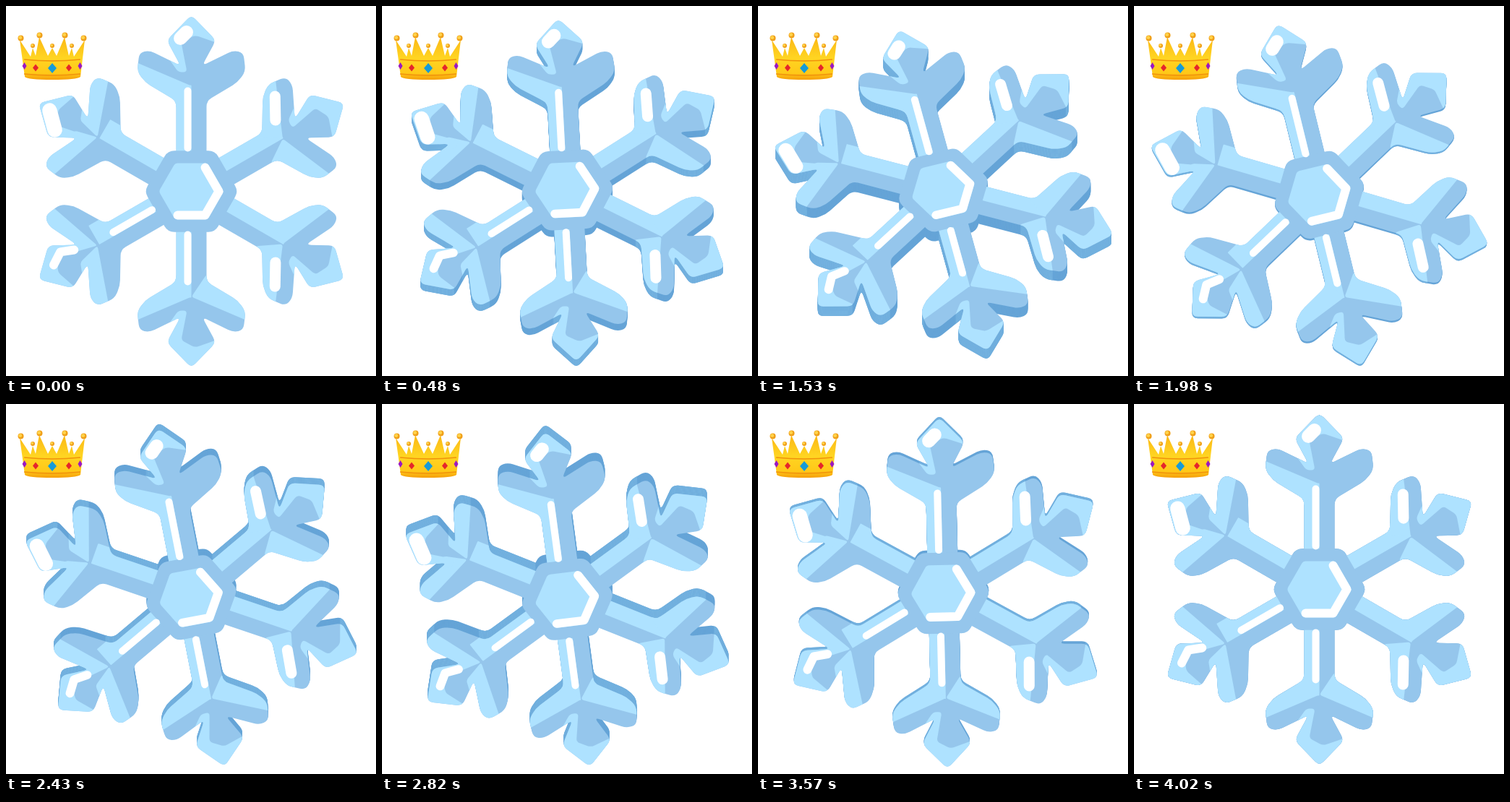
Write an HTML page with a canvas that moves like this. It is 512 px wide and 512 px high and loops after 4.05 s.

```html
<!DOCTYPE html>
<html lang="en">
<head>
<meta charset="utf-8">
<title>Snowflake</title>
<style>
html, body { margin: 0; width: 100%; height: 100%; overflow: hidden; background: #fff; }
canvas { display: block; width: 100vw; height: 100vh; }
</style>
</head>
<body>
<canvas id="stage" width="512" height="512"></canvas>
<script>
const ctx = document.getElementById('stage').getContext('2d');
const LOOP = 4050, STEP = 30, DEPTH = 39, MID = 256.5;
const FACE = { light: '#aee2ff', mid: '#95c6ec' };
const SIDE = { light: '#75b3e0', mid: '#65a4d7' };

// Closed path with rounded corners; each point is [across, outward].
function shape(points, radius) {
  const path = new Path2D(), n = points.length;
  const mix = (a, b, u) => [a[0] + (b[0] - a[0]) * u, -(a[1] + (b[1] - a[1]) * u)];
  points.forEach((p, i) => {
    const toward = q => mix(p, q, Math.min(0.5, radius / Math.hypot(q[0] - p[0], q[1] - p[1])));
    const start = toward(points[(i + n - 1) % n]);
    if (i) path.lineTo(...start); else path.moveTo(...start);
    path.quadraticCurveTo(p[0], -p[1], ...toward(points[(i + 1) % n]));
  });
  path.closePath();
  return path;
}

const flip = (points, s) => points.map(([x, r]) => [x * s, r]);

const hexagon = radius => Array.from({ length: 6 }, (_, i) =>
  [radius * Math.cos(i * Math.PI / 3), radius * Math.sin(i * Math.PI / 3)]);

// Right half of an arm: stem, branch, notch, tip.
const half = [[21, 40], [21, 125], [64, 151], [75, 166], [72, 192], [58, 195], [15, 174], [34, 209]];
const outline = shape([...half, [0, 244], ...flip(half, -1).reverse()], 8);

// Lit facets; s is the lit side looking outward, b the side of the branch.
const stemLight = s => shape(flip([[0, 30], [0, 147], [30, 147], [30, 30]], s), 1);
const branchLight = (b, s) => shape(flip(s === b ?
  [[0, 146], [80, 180], [90, 145], [21, 115]] :
  [[0, 150], [80, 178], [80, 210], [8, 182]], b), 4);
const tipLight = s => shape(flip(
  [[6, 165], [14, 206], [-5, 216], [-40, 204], [0, 260], [50, 210], [18, 165]], s), 5);

// Lit side of stem, left branch, right branch and tip, clockwise from the top arm.
const arms = ['LL-L', 'LLRL', 'LLRR', 'RLRR', 'RRLR', 'RRLL'].map(lit => {
  const [stem, left, right, tip] = [...lit].map(c => ({ L: -1, R: 1 })[c]);
  const lights = [stemLight(stem), branchLight(-1, left), tipLight(tip)];
  if (right) lights.push(branchLight(1, right));
  return lights;
});

const hub = shape(hexagon(65), 9);
const core = shape(hexagon(45), 4);

// Cosine easing through [time, value] poses.
function track(...poses) {
  return t => {
    const i = poses.findIndex(p => p[0] > t);
    const [t0, a] = poses[i - 1], [t1, b] = poses[i];
    return a + (b - a) * (1 - Math.cos(Math.PI * (t - t0) / (t1 - t0))) / 2;
  };
}

const turnAt = track([0, 0], [1600, 14.6], [LOOP, 0]);
const tiltAt = track([0, 0], [900, 24], [1200, 24.5], [2750, -17], [LOOP, 0]);
const liftAt = track([0, 0], [1050, -4.5], [2900, 14], [LOOP, 0]);
const rad = deg => deg * Math.PI / 180;

function fill(path, color) {
  ctx.fillStyle = color;
  ctx.fill(path);
}

function onArm(i, draw) {
  ctx.save();
  ctx.rotate(i * Math.PI / 3);
  draw();
  ctx.restore();
}

function drawBody(tone) {
  arms.forEach((lights, i) => onArm(i, () => {
    fill(outline, tone.mid);
    ctx.clip(outline);
    for (const l of lights) fill(l, tone.light);
  }));
  fill(hub, tone.mid);
}

function glint(width, ...points) {
  ctx.strokeStyle = '#fff';
  ctx.lineCap = ctx.lineJoin = 'round';
  ctx.lineWidth = width;
  ctx.beginPath();
  for (const [x, r] of points) ctx.lineTo(x, -r);
  ctx.stroke();
}

function drawGlints() {
  fill(core, FACE.light);
  const [right, upper, , , lowLeft, low] = hexagon(38);
  glint(12, upper, right, low, lowLeft);
  for (const [i, s, end] of [[0, -1, 139], [3, 1, 125], [4, 1, 122]])
    onArm(i, () => glint(10, [s * 5, 60], [s * 5, end]));
  for (const [i, s] of [[1, -1], [2, 1]])
    onArm(i, () => glint(15, [s * 27, 150], [s * 56, 166]));
  for (const [i, size] of [[0, 6], [5, 14]])
    onArm(i, () => glint(17 + size / 4, [-11 - size * 0.7, 216 - size * 0.7], [-11 + size * 0.7, 216 + size * 0.7]));
  onArm(4, () => glint(12, [7, 216], [18, 199], [11, 181]));
}

function drawFlake(t) {
  const tilt = rad(tiltAt(t)), turn = rad(turnAt(t));
  const lift = liftAt(t), reach = DEPTH * Math.sin(tilt);
  const place = shift => {
    ctx.setTransform(1, 0, 0, Math.cos(tilt), MID, MID + lift + shift);
    ctx.rotate(-turn);
  };
  const layers = Math.ceil(Math.abs(reach));
  for (let i = layers; i > 0; i--) {
    place(reach * i / layers);
    drawBody(SIDE);
  }
  place(0);
  drawBody(FACE);
  drawGlints();
  ctx.setTransform(1, 0, 0, 1, 0, 0);
}

const crown = new Path2D('M19 47L34 70L37 58L41 69L46 43L58 69L64 58L70 69L81 43L87 69L91 58L94 70L109 47L103 98Q98 102 64 102Q30 102 26 98Z');

function gem(x, y, rx, ry, color) {
  fill(new Path2D(`M${x} ${y - ry}L${x + rx} ${y}L${x} ${y + ry}L${x - rx} ${y}Z`), color);
}

function disc(x, y, r, color) {
  ctx.fillStyle = color;
  ctx.beginPath();
  ctx.arc(x, y, r, 0, Math.PI * 2);
  ctx.fill();
}

function ball(x, y, r) {
  disc(x, y, r, '#f0a01a');
  disc(x - 0.8, y - 0.8, r * 0.6, '#ffd34a');
}

function drawCrown() {
  const gold = ctx.createLinearGradient(0, 42, 0, 102);
  gold.addColorStop(0, '#fbb616');
  gold.addColorStop(0.5, '#ffd522');
  gold.addColorStop(0.85, '#ffc818');
  gold.addColorStop(1, '#f59e0a');
  fill(crown, gold);
  ctx.lineCap = 'butt';
  ctx.strokeStyle = '#f0920c';
  ctx.lineWidth = 1.3;
  for (const y of [75, 95]) {
    ctx.beginPath();
    ctx.moveTo(25, y - 1);
    ctx.quadraticCurveTo(64, y + 3, 103, y - 1);
    ctx.stroke();
  }
  for (const s of [-1, 1]) {
    ball(64 + s * 43.5, 44.5, 4);
    ball(64 + s * 17.5, 40.5, 4);
    ball(64 + s * 27, 55, 3);
    gem(64 + s * 23, 85.5, 4, 5, '#e5262b');
    gem(64 + s * 38.5, 83, 3, 5, '#9a18c4');
  }
  ball(64, 55, 3);
  gem(64, 86, 6, 7, '#169bd8');
}

let start;
function frame(now) {
  start ??= now;
  const t = Math.floor((now - start) / STEP) * STEP % LOOP;
  ctx.fillStyle = '#fff';
  ctx.fillRect(0, 0, 512, 512);
  drawFlake(t);
  drawCrown();
  requestAnimationFrame(frame);
}
requestAnimationFrame(frame);
</script>
</body>
</html>
```
